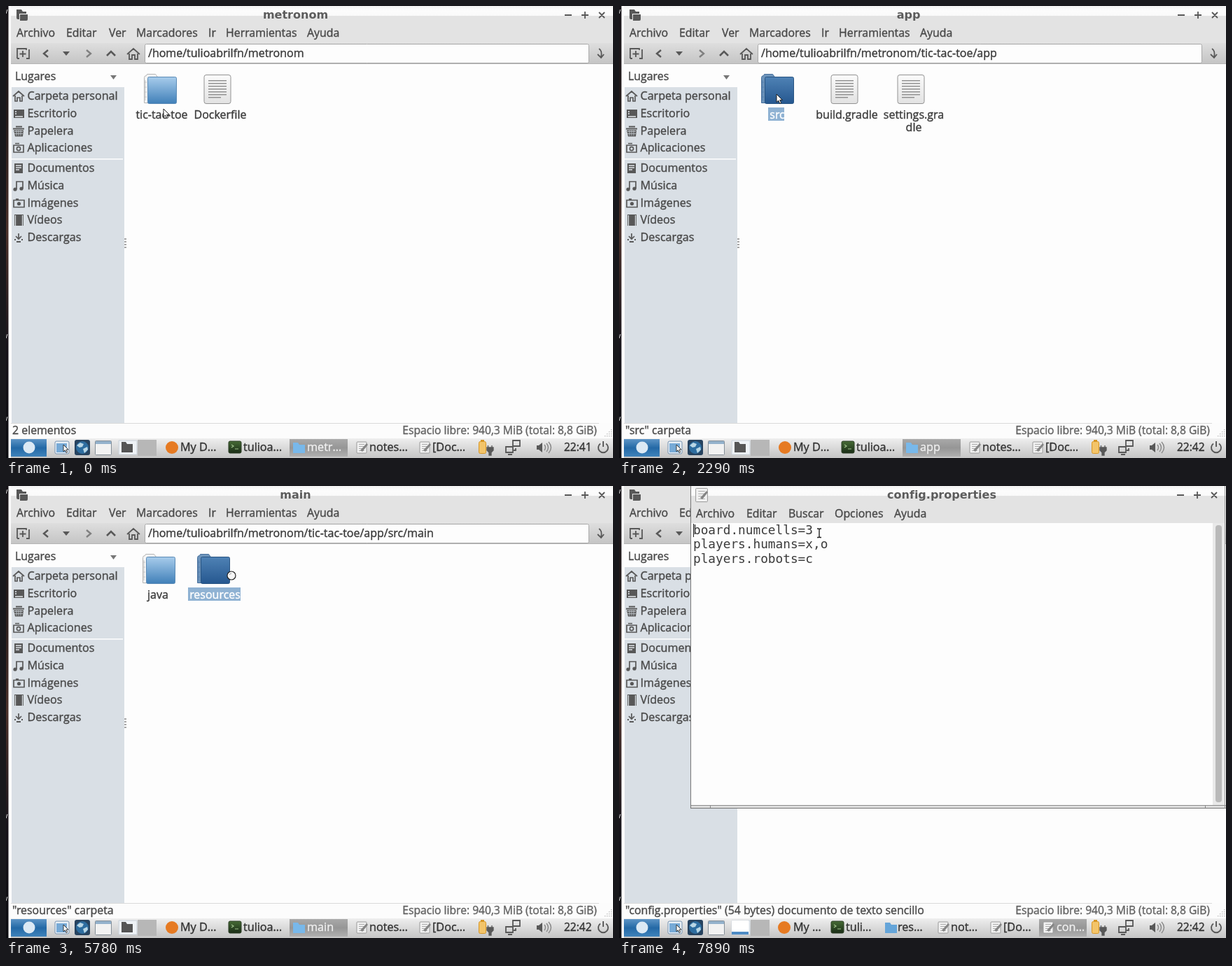
Recreate the animation shown at these times as an HTML page with a canvas. Size 867 px wide and 646 px high, loop 8 s.

```html
<!DOCTYPE html>
<html lang="es">
<head>
<meta charset="utf-8">
<style>
html, body { margin: 0; width: 100%; height: 100%; overflow: hidden; background: #fdfdfd; }
canvas { display: block; }
</style>
</head>
<body>
<canvas id="stage" width="867" height="646"></canvas>
<script>
const g = document.getElementById('stage').getContext('2d');
const LOOP = 8000;
const ui = size => size + 'px "Open Sans", "Noto Sans", sans-serif';
const TITLE = 'bold 16px "DejaVu Sans", sans-serif';
const MONO = '17.75px "DejaVu Sans Mono", monospace';
const INK = '#4a4a4a', ICON = '#585858', BLUE = '#8fb2d3';

function rect(x, y, w, h, fill, stroke, r = 0) {
  g.beginPath();
  g.roundRect(x, y, w, h, r);
  if (fill) { g.fillStyle = fill; g.fill(); }
  if (stroke) { g.strokeStyle = stroke; g.lineWidth = 1; g.stroke(); }
}
function disc(x, y, r, fill, stroke, w = 1) {
  g.beginPath();
  g.arc(x, y, r, 0, 7);
  if (fill) { g.fillStyle = fill; g.fill(); }
  if (stroke) { g.strokeStyle = stroke; g.lineWidth = w; g.stroke(); }
}
function path(d, fill, stroke, w = 1, x = 0, y = 0) {
  g.save();
  g.translate(x, y);
  const p = new Path2D(d);
  if (fill) { g.fillStyle = fill; g.fill(p); }
  if (stroke) { g.strokeStyle = stroke; g.lineWidth = w; g.stroke(p); }
  g.restore();
}
// Interface text gets a hairline outline for a medium weight
function text(s, x, mid, color = INK, align = 'left', font = ui(15.9)) {
  g.font = font;
  g.textAlign = align;
  g.fillStyle = g.strokeStyle = color;
  g.fillText(s, x, mid + 5);
  if (font == TITLE || font == MONO) return;
  g.lineWidth = .4;
  g.strokeText(s, x, mid + 5);
}
function shade(y0, y1, ...colors) {
  const s = g.createLinearGradient(0, y0, 0, y1);
  colors.forEach((c, i) => s.addColorStop(i / (colors.length - 1), c));
  return s;
}

// Directory views: [name, label x, icon x, kind]
const home = '/home/tulioabrilfn/metronom';
const build = ['build.gradle', 325.5, 322, 'doc'];
const settings = ['settings.gra|dle', 421, 417, 'doc'];
const dirs = {
  metronom: { path: home, tab: 'metr…', items: [['tic-tac-toe', 222.5, 220, 'dir'], ['Dockerfile', 306, 302, 'doc']] },
  toe: { title: 'tic-tac-toe', path: home + '/tic-tac-toe', tab: 'tic-ta…',
    items: [['app', 226, 226, 'dir'], build, settings, ['tic-tac-|toe.iml', 513, 513, 'web']] },
  app: { path: home + '/tic-tac-toe/app', items: [['src', 226, 226, 'dir'], build, settings] },
  src: { path: home + '/tic-tac-toe/app/src', items: [['main', 207.5, 208, 'dir'], ['test', 266, 266, 'dir']] },
  main: { path: home + '/tic-tac-toe/app/src/main', items: [['java', 217, 218, 'dir'], ['resources', 298.5, 296, 'dir']] },
  resources: { path: home + '/tic-tac-toe/app/src/main/resources', tab: 'resou…',
    items: [['config.prop|erties', 228, 225, 'doc']] }
};
// [start, directory, selected item, status]
const views = [
  [0, 'metronom', -1, '2 elementos'],
  [670, 'metronom', 0, '"tic-tac-toe" carpeta'],
  [810, 'toe', -1, '4 elementos'],
  [1350, 'toe', 0, '"app" carpeta'],
  [1490, 'app', -1, ''],
  [1610, 'app', -1, '3 elementos'],
  [2290, 'app', 0, '"src" carpeta'],
  [3410, 'src', -1, ''],
  [3560, 'src', -1, '2 elementos'],
  [4750, 'src', 0, '"main" carpeta'],
  [4870, 'main', -1, '2 elementos'],
  [5660, 'main', 1, '"resources" carpeta'],
  [5900, 'resources', -1, '1 elemento'],
  [6700, 'resources', 0, '"config.properties" (54 bytes) documento de texto sencillo']
];
// [start, x, y, shape]
const pointer = [
  [0, 225, 147, 'arrow'], [120, 225, 142, 'arrow'], [270, 225, 133, 'arrow'], [390, 225, 126, 'arrow'],
  [3930, 252, 126, 'arrow'], [4050, 271, 125, 'arrow'], [4320, 242, 125, 'arrow'], [4440, 219, 125, 'arrow'],
  [5270, 275, 148, 'arrow'], [5390, 321, 127, 'arrow'], [5780, 322, 128, 'wait'], [5900, 321, 127, 'arrow'],
  [6330, 262, 128, 'arrow'], [6450, 223, 128, 'arrow'], [6860, 223, 128, 'busy'], [7010, 0, 0, 'none'],
  [7260, 224, 130, 'beam'], [7410, 226, 131, 'beam'], [7530, 246, 112, 'beam'], [7650, 267, 86, 'beam'],
  [7770, 283, 69, 'beam'], [7890, 286, 67, 'beam']
];
const at = (list, t) => list.findLast(e => e[0] <= t);

function folder(x, sel) {
  const l = x - 24;
  path('M1 41V5q0-3 3-3l1-2h12l3 4h23v37z', sel ? '#6d94bb' : '#f6f6f6', sel ? '#48709c' : '#b4b4b4', 1, l + .5, 97.5);
  path('M3 9v29M2 12h3M2 19h3M2 26h3M2 33h3', null, sel ? '#557fac' : '#c8c8c8', 1, l, 97);
  rect(l + 6.5, 101.5, 41, 38, sel ? shade(101, 140, '#4f82b5', '#25578f') : shade(101, 140, '#a9cdec', '#3f7fb8'),
    sel ? '#285482' : '#5b8bb6', 2);
  if (sel) rect(l + 7, 111, 40, 1, '#4378ab');
}
function doc(x, sel) {
  rect(x - 19, 98.5, 38, 41, sel ? '#7193b4' : shade(98, 140, '#fbfbfb', '#e2e2e2'), sel ? '#45688c' : '#929292', 3);
  for (let i = 0; i < 7; i++) rect(x - 13, 106 + i * 4, i == 6 ? 18 : 26, 1.4, sel ? '#355679' : '#8c8c8c');
}
function globe(x, y, r, color) {
  disc(x, y, r, null, color, 1.4);
  g.beginPath();
  g.ellipse(x, y, r * .45, r, 0, 0, 7);
  g.stroke();
  path(`M${-r} 0H${r}M0 ${-r}V${r}M${-r * .85} ${-r / 2}H${r * .85}M${-r * .85} ${r / 2}H${r * .85}`, null, color, 1.2, x, y);
}
function web(x) {
  rect(x - 19, 98.5, 38, 41, '#e9eef4', '#6d84a0', 2);
  rect(x - 17, 100, 34, 38, shade(100, 138, '#3f6ea8', '#7ba3d0'));
  globe(x, 119, 10.5, '#f4f8fc');
}
function item([name, lx, ix, kind], sel) {
  ({ dir: folder, doc, web })[kind](ix, sel);
  const lines = name.split('|'), font = ui(16);
  if (sel) {
    g.font = font;
    const w = Math.max(...lines.map(s => g.measureText(s).width)) + 2;
    rect(Math.round(lx - w / 2) - 1, 145, Math.round(w), 1 + 18 * lines.length, BLUE);
  }
  lines.forEach((s, i) => text(s, lx, 156 + 18 * i, sel ? '#fff' : '#3c3c3c', 'center', font));
}

function titleBar(x, title, mid, off, focused = true) {
  rect(x, 0, 867 - x, 53, '#e3e3e3');
  if (focused) rect(x, 0, 867 - x, 14, shade(0, 14, '#f1f1f1', '#fcfcfc', '#fafafa'));
  text(title, mid, 13, '#5c5c5c', 'center', TITLE);
  path('M798 13h10M822 13h10M827 8v10M847 9l8 8M855 9l-8 8', null, ICON, 1.8, off, 0);
}
const menu = (entries, y) => entries.forEach(([s, x]) => text(s, x, y));

function sideIcon(i, y) {
  const solid = d => path(d, ICON, null, 1, 10, y - 8);
  const line = (d, w = 1.7, color = ICON) => path(d, null, color, w, 10, y - 8);
  if (i == 0) line('M0 8L8 1l8 7M3 7v8h3v-5h4v5h3V7');
  if (i == 1) { solid('M1 2h15v12H1z'); line('M3 5h2M3 8h2M3 12h11', 1.4, '#e6eaee'); }
  if (i == 2) { solid('M0 4h16v2H0zM4 1h9v2H4zM1 7h14l-1 9H3z'); line('M2 9h12M2 12h12M5 7v8M8 7v8M11 7v8', .8, '#c6cdd4'); }
  if (i == 3) { line('M1 4h14v10H1zM3 1.5h6'); disc(18, y + 1, 2.6, null, ICON, 1.6); }
  if (i == 4) { solid('M2 1h12v14H2z'); line('M4 4h8M4 7h8M4 10h5', 1.3, '#dfe4e9'); }
  if (i == 5) { line('M5 13V2h9v10'); disc(13, y + 5, 2.6, ICON); disc(22, y + 4, 2.6, ICON); }
  if (i == 6) { line('M1 4h15v10H1zM4 2.5h4'); disc(18.5, y + 1, 2.6, ICON); }
  if (i == 7) { solid('M2 0h13v16H2z'); line('M3.5 1v15M13.5 1v15', 1.2, '#dfe4e9'); }
  if (i == 8) { line('M8 2v7M4 6l4 4 4-4'); solid('M2 10h2v2H2zM5 13h6v2H5zM12 10h2v2h-2z'); }
}
const places = [['Carpeta personal', 129], ['Escritorio', 154], ['Papelera', 178.5], ['Aplicaciones', 203],
  ['Documentos', 232], ['Música', 257], ['Imágenes', 281.5], ['Vídeos', 306], ['Descargas', 331]];

function smallFolder(x, y, color) {
  path('M1 2h7l2 3h8v12H1z', color, null, 1, x - 9, y - 9);
}
function fileManager(dir, name, sel, status, focused) {
  titleBar(7, dir.title || name, 413.5, 0, focused);
  path('M1 1h7l2 3h5v3H5v8H3q-2 0-2-2zM6 8h11v7q0 2-2 2H6z', ICON, null, 1, 14, 4);
  menu([['Archivo', 15], ['Editar', 86], ['Ver', 147], ['Marcadores', 186], ['Ir', 289], ['Herramientas', 314], ['Ayuda', 430]], 39);

  rect(7, 53, 860, 30, shade(53, 83, '#dedede', '#c4c4c4'));
  rect(7, 82, 860, 1, '#b4b4b4');
  path('M16 75v-14h13v2M16 75h3M33 62v13h-4M24 64v9M19.5 68.5h9', null, ICON, 1.8);
  path('M60 63l-6 5 6 5', null, ICON, 2.4);
  path('M81 65h10l-5 6z', ICON);
  path('M115 63l6 5-6 5', null, '#808080', 2.4);
  path('M144 71l6-6 6 6', null, ICON, 2.6);
  path('M173 69l9-8 9 8M176 68v8h4v-6h4v6h4v-8', null, ICON, 1.8);
  rect(198.5, 54.5, 634, 27, '#fdfdfd', '#a9a9a9', 2);
  text(dir.path, 203, 68, '#3c3c3c', 'left', ui(16));
  path('M847 61q5 3 3 12M845 69l5 5 4-5', null, ICON, 1.8);

  rect(7, 83, 860, 514, '#fdfdfd');
  text('Lugares', 13, 101);
  path('M149 99h9l-4.500 6z', '#777');
  rect(8, 116, 161, 480, '#d9dfe5');
  rect(8, 218, 159, 1.5, '#fff');
  places.forEach(([s, y], i) => { sideIcon(i, y); text(s, 30.5, y, INK, 'left', ui(16.1)); });
  for (let i = 0; i < 4; i++) rect(169, 332 + i * 4, 3, 2, '#a8a8a8');
  if (status) dir.items.forEach((e, i) => item(e, i == sel));

  rect(7, 596, 860, 22, '#fcfcfc');
  rect(7, 596, 840, 1, '#dadada');
  text(status, 9, 607, INK, 'left', ui(15.9));
  text('Espacio libre: 940,3 MiB (total: 8,8 GiB)', 844, 607, '#646464', 'right', ui(15.65));
  for (let i = 0; i < 4; i++) for (let j = 0; j <= i; j++) rect(864 - j * 3, 605 + i * 3, 1.3, 1.3, '#b5b5b5');
}

function note(x, y, s = 1) {
  rect(x - 7 * s, y - 8 * s, 14 * s, 16 * s, '#f2f2f2', '#999', 1);
  for (let i = 0; i < 4; i++) rect(x - 4 * s, y - 5 * s + i * 3 * s, 8 * s, 1, '#aaa');
  path('M-2 4L7 -6l2 2L1 6z', '#858585', null, 1, x, y);
}
function task(kind, x, label, lx) {
  if (kind == 'web') disc(x, 631, 9, '#e67a22');
  if (kind == 'term') {
    rect(x - 9, 622, 18, 17, shade(622, 639, '#466b35', '#192c16'), '#2b3d25', 2);
    path('M-5 -4l3 2-3 2M0 2h5', null, '#9fc28b', 1.2, x, 631);
  }
  if (kind == 'dir') smallFolder(x, 631, '#65a5d9');
  if (kind == 'note') note(x, 631);
  text(label, lx, 631, '#333', 'left', ui(16.2));
}
function activeTask(x, w, kind, label, lx) {
  rect(x, 619, w, 25, shade(619, 644, '#a9a9a9', '#969696', '#b0b0b0'));
  if (kind == 'dir') smallFolder(x + 13, 631, '#78b8ea'); else note(x + 13, 631);
  text(label, lx, 631, '#efefef', 'left', ui(16.2));
}
function taskBar(tab, editing, clock) {
  rect(7, 618, 860, 28, shade(618, 646, '#eeeeee', '#d9d9d9', '#c5c5c5'));
  rect(7, 619, 51, 25, shade(619, 644, '#5d94c5', '#2469a6', '#3f83bb'));
  disc(33, 631, 8.5, '#dce9f4');

  rect(70, 622, 20, 18, '#e8eff6', '#7793b0', 2);
  rect(72, 625, 15, 13, '#77aad6');
  arrow(82, 627, .85);
  rect(98, 620, 22, 22, '#27435f', null, 3);
  disc(109, 631, 9, '#2d6da0');
  path('M-8 -3l5-4 5 2-2 4-4 1zM1 2l6-3 1 4-5 5z', '#b8d6e5', null, 1, 109, 631);
  rect(127.5, 621.5, 23, 20, '#f2f2f2', '#858f98', 1);
  rect(128, 622, 22, 4, '#93b1cb');
  rect(161, 621, 26, 20, '#eef2f6', '#c8d0d8');
  if (editing) { rect(161, 621, 24, 17, '#fff'); rect(161, 637, 24, 4, '#4d8bc4'); }
  else path('M0 0h6l2 3h8v12H0z', '#555', null, 1, 165, 623);
  rect(188, 620, 27, 23, '#b7b7b7');

  if (editing) {
    task('web', 236, 'My …', 249);
    task('term', 312, 'tuli…', 324);
    task('dir', 388, 'res…', 398);
    task('note', 463, 'not…', 474);
    task('note', 538, '[Do…', 549);
    activeTask(600, 68, 'note', 'con…', 625);
  } else {
    task('web', 237, 'My D…', 249);
    task('term', 327, 'tulioa…', 339);
    activeTask(405, 83, 'dir', tab, 430);
    task('note', 508, 'notes…', 519);
    task('note', 598, '[Doc…', 609);
  }

  rect(675.5, 622.5, 10, 17, '#f3c469', '#d79625', 2);
  rect(678, 620, 5, 3, '#d79625');
  path('M687 631h9v4l-3 3v4h-3v-4l-3-3zM688.5 628v3M694 628v3', ICON, ICON, 1.3);
  path('M724 621h10v8h-10zM714 630h10v8h-10zM717 641h6M728 632v3h-3', null, ICON, 1.8);
  path('M758 628h3l5-4v14l-5-4h-3z', ICON);
  path('M769 627q3 4 0 8M772 625q5 6 0 12M775 623q7 8 0 16', null, '#888', 1.4);
  text(clock, 797, 631, '#333', 'left', ui(15.5));
  path('M849 625.5a7 7 0 1 0 8 0M853 622v8', null, ICON, 1.9);
}

function editor(caret) {
  titleBar(102, 'config.properties', 461, -1);
  note(118, 13, 1.2);
  menu([['Archivo', 110], ['Editar', 182], ['Buscar', 242], ['Opciones', 308], ['Ayuda', 393]], 40);
  rect(103, 53, 745, 403, '#fdfdfd');
  rect(848, 53, 17, 403, '#e9e9e9');
  rect(852, 56, 9, 396, '#b9b9b9', null, 4);
  ['board.numcells=3', 'players.humans=x,o', 'players.robots=c'].forEach((s, i) =>
    text(s, 106, 64 + i * 20.3, '#3c3c3c', 'left', MONO));
  if (caret) rect(106, 54, 1, 19, '#222');
  rect(102, 456, 765, 1, '#8c8c8c');
  rect(102, 457, 765, 3, '#dedede');
  rect(102, 460, 765, 1, '#777');
  rect(102, 0, 1, 461, '#777');
  rect(865, 0, 1, 461, '#999');
  rect(130, 457, 1, 3, '#888');
  rect(837, 457, 1, 3, '#888');
}

function arrow(x, y, s = 1) {
  g.save();
  g.translate(x, y);
  g.scale(s, s);
  path('M0 0v11.5l2.7-2.4 2 4.4 2-.9-2-4.3h3.6z', '#fff', '#1c1c1c', 1);
  g.restore();
}
function drawPointer([, x, y, shape]) {
  if (shape == 'arrow' || shape == 'busy') arrow(x, y);
  if (shape == 'busy') disc(x + 5, y + 7, 4.2, '#f6f6f6', '#222');
  if (shape == 'wait') {
    disc(x, y, 6, '#f6f6f6', '#222', 1.2);
    path('M-3 -1q1-2 3-2', null, '#999', 1, x, y);
  }
  if (shape == 'beam') path('M-3 -6h2l1 1 1-1h2M0 -5v11M-3 6.5h2l1-1 1 1h2', null, '#222', 1.4, x, y);
}

function draw(t) {
  const [, name, sel, status] = at(views, t), dir = dirs[name], editing = t >= 7010;
  rect(0, 0, 867, 646, '#fdfdfd');
  rect(0, 0, 3.5, 646, shade(0, 646, '#161318', '#241a1a', '#4a302a', '#17131a', '#0c0c10'));
  for (const y of [8, 472, 590]) path('M0 3L2 -3', null, '#ddd', 1, 0, y);
  fileManager(dir, name, sel, status, !editing);
  if (editing) editor(t >= 7410);
  taskBar(dir.tab || name, editing, t < 1490 ? '22:41' : '22:42');
  drawPointer(at(pointer, t));
}
function tick() {
  draw(performance.now() % LOOP);
  requestAnimationFrame(tick);
}
tick();
</script>
</body>
</html>
```
